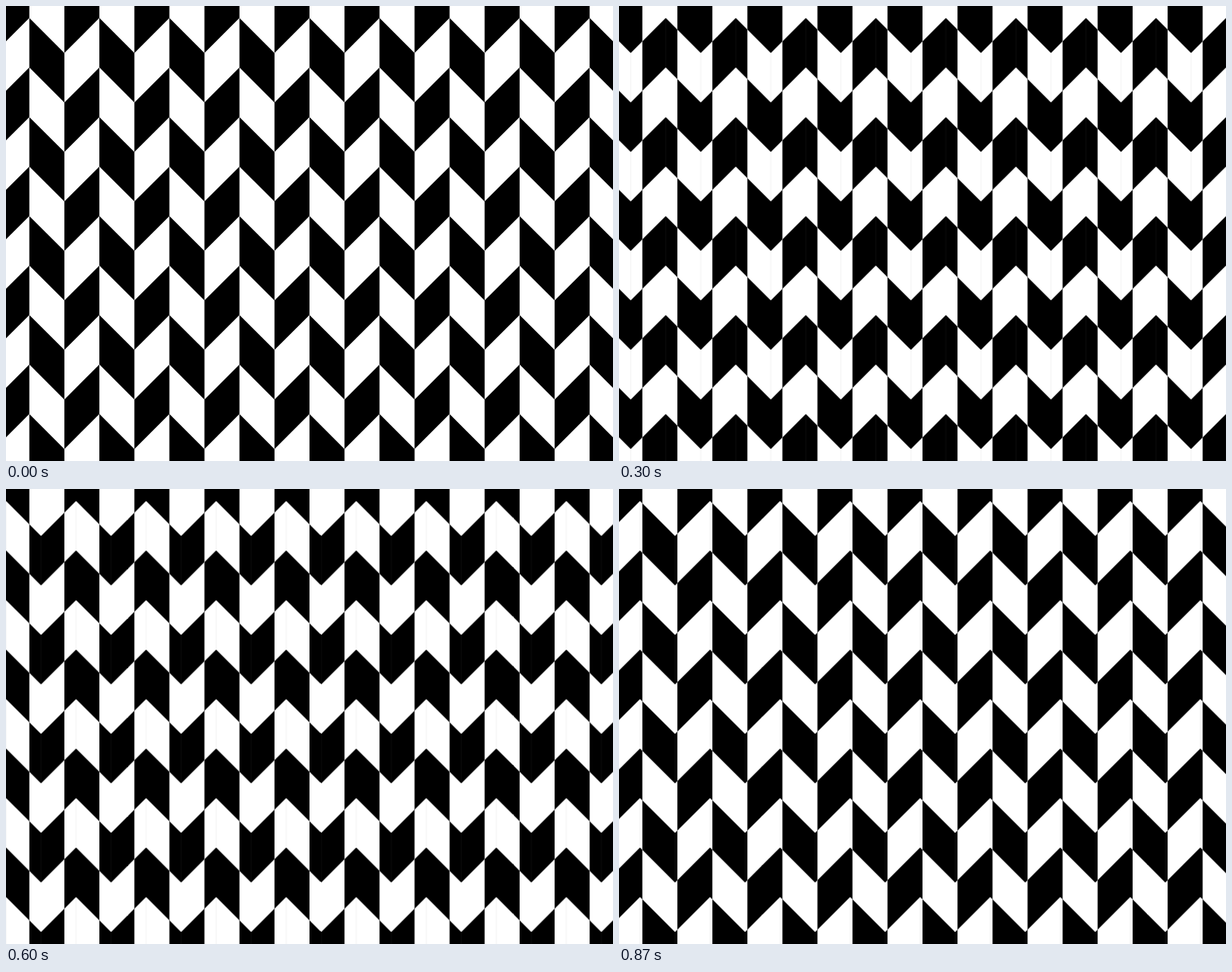
An HTML page that plays this animation: 800 px wide and 600 px high, repeating every 0.9 s.

```html
<!DOCTYPE html>
<html lang="en">
<head>
<meta charset="utf-8">
<title>Sliding chevrons</title>
<style>
  html, body { margin: 0; width: 100%; height: 100%; overflow: hidden; background: #fff; }
  svg { display: block; width: 800px; height: 600px; background: #fff; isolation: isolate; }
  #blend { mix-blend-mode: difference; }
  #strips { fill: #fff; }
  #seams { fill: none; stroke: #000; stroke-opacity: .05; }
</style>
</head>
<body>
<svg viewBox="0 0 800 600">
  <rect width="800" height="600" fill="#fff"/>
  <path id="columns"/>
  <g id="blend">
    <g id="slide">
      <path id="strips"/>
      <path id="seams"/>
    </g>
  </g>
</svg>
<script>
const W = 600 / 13;            // column width, also the zigzag height
const H = W * Math.SQRT2;      // strip height
const LEFT = 400 - 8 * W;      // a column edge under a peak
const TOP = 300 - W / 2 - 4 * H;
const LOOP = 900, STEPS = 30;

const get = id => document.getElementById(id);
const setPath = (id, d) => get(id).setAttribute('d', d);

let columns = '';
for (let k = -1; k < 18; k += 2) columns += `M${LEFT + k * W} 0h${W}v600h${-W}z`;
setPath('columns', columns);

// Corners of the zigzag: peaks at even k, valleys at odd k.
const corners = [];
for (let k = -4; k <= 18; k++) corners.push([LEFT + k * W, k % 2 ? W : 0]);

let strips = '', seams = '';
for (let y = TOP - 2 * H; y < 600; y += 2 * H) {
  const upper = corners.map(([x, dy]) => `${x} ${y + dy}`);
  const lower = corners.map(([x, dy]) => `${x} ${y + dy + H}`).reverse();
  strips += `M${[...upper, ...lower].join('L')}z`;
  seams += upper.map(p => `M${p}v${H}`).join('');
}
setPath('strips', strips);
setPath('seams', seams);

// The small negative delay keeps step edges clear of rounding.
get('slide').animate(
  [{ transform: 'translateX(0px)' }, { transform: `translateX(${2 * W}px)` }],
  { duration: LOOP, iterations: Infinity, easing: `steps(${STEPS}, end)`, delay: -1 }
);
</script>
</body>
</html>
```
